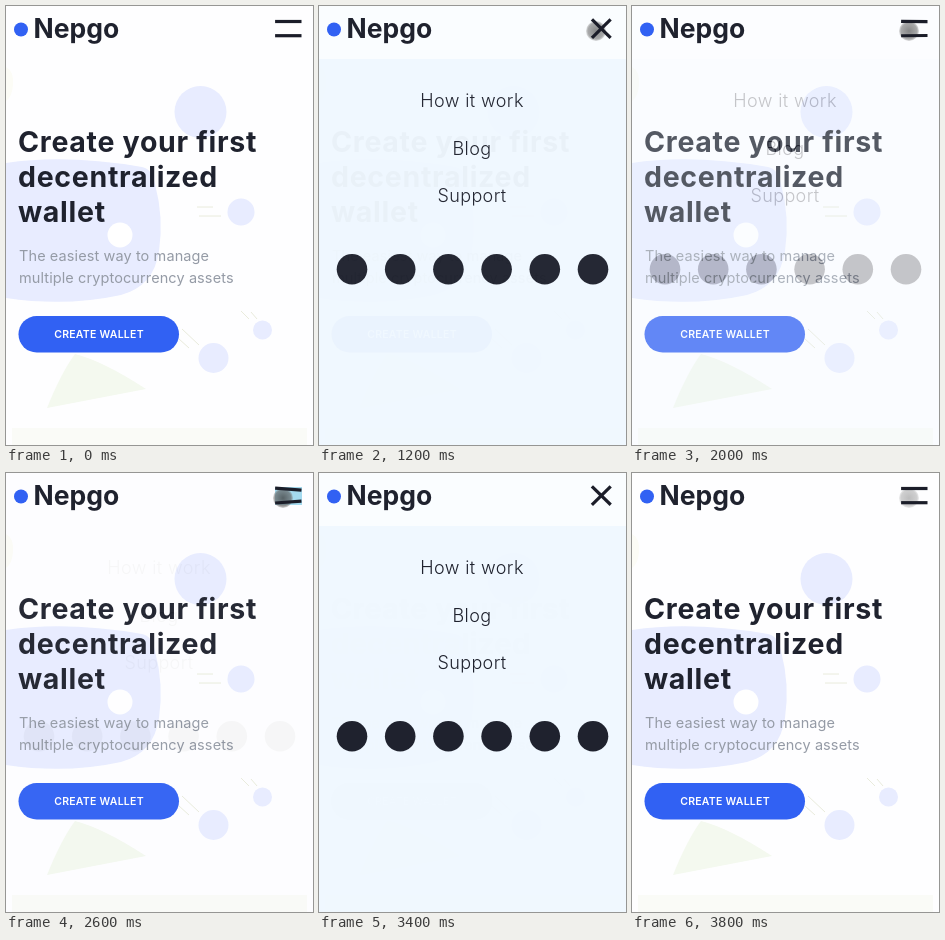
Recreate the animation shown at these times as an HTML page. Size 307 by 439 pixels, loop 4200 ms.

```html
<!DOCTYPE html>
<html lang="en">
<head>
<meta charset="utf-8">
<title>Wallet landing page menu</title>
<style>
  html, body { margin: 0; width: 100%; height: 100%; overflow: hidden; background: #fefeff; }
  svg { display: block; width: 100%; height: 100%; }
  text { font-family: Inter, "Open Sans", sans-serif; fill: #1f222e; }
  .brand { font-size: 26.5px; font-weight: 700; }
  .title { font-size: 28.5px; font-weight: 700; letter-spacing: .7px; }
  .lead { font-size: 14.5px; letter-spacing: .1px; fill: #959ba6; }
  .label { font-size: 10.5px; font-weight: 600; letter-spacing: .25px; fill: #fff; text-anchor: middle; }
  .link { font-size: 18px; font-weight: 300; letter-spacing: .4px; text-anchor: middle; }
  .coin { fill: #e8ecff; }
  .dash { stroke: #e9ebdc; fill: none; }
</style>
</head>
<body>
<svg viewBox="0 0 307 439">
  <defs>
    <radialGradient id="touch">
      <stop offset="0" stop-color="#444" stop-opacity=".8"/>
      <stop offset=".8" stop-color="#666" stop-opacity=".7"/>
      <stop offset="1" stop-color="#888" stop-opacity=".35"/>
    </radialGradient>
  </defs>

  <!-- page -->
  <path class="coin" d="M0 157Q60 148 136 161Q146 163 149 178Q158 212 153 245Q148 280 115 289Q60 301 0 292Z"/>
  <path d="M0 61Q8 65 7 79Q6 91 0 95Z" fill="#fcfcf6"/>
  <path d="M69 348Q97 355 140 383L41 402Q55 367 69 348Z" fill="#f4f9ef"/>
  <rect x="6" y="422" width="295" height="17" fill="#fafbf7"/>
  <path class="dash" d="M191 201h16M193 210h22M176 323l17 16M173 333l10 9M235 305l8 8M245 306l6 7"/>
  <g class="coin">
    <circle cx="194.5" cy="106" r="26"/>
    <circle cx="235" cy="206" r="13.5"/>
    <circle cx="207.5" cy="352" r="15"/>
    <circle cx="256.5" cy="324" r="9.5"/>
  </g>
  <circle cx="114" cy="229" r="12.5" fill="#fff"/>
  <g class="title">
    <text x="12" y="146">Create your first</text>
    <text x="12" y="181">decentralized</text>
    <text x="12" y="216">wallet</text>
  </g>
  <text class="lead" x="13" y="255">The easiest way to manage</text>
  <text class="lead" x="13" y="277">multiple cryptocurrency assets</text>
  <rect x="12.5" y="310" width="160.5" height="36.5" rx="18.2" fill="#3161f3"/>
  <text class="label" x="93" y="332">CREATE WALLET</text>

  <!-- menu -->
  <g id="menu">
    <rect width="307" height="53" fill="#fafdff"/>
    <rect y="53" width="307" height="386" fill="#f0f8ff"/>
    <text class="link" x="153" y="101">How it work</text>
    <text class="link" x="153" y="149">Blog</text>
    <text class="link" x="153" y="196">Support</text>
    <g id="socials" fill="#1f222e"></g>
  </g>

  <!-- header -->
  <circle cx="15" cy="23.5" r="7" fill="#3161f3"/>
  <text class="brand" x="27.5" y="31.5">Nepgo</text>
  <rect id="highlight" x="269" y="14" width="27" height="18" fill="#8fd3ec"/>
  <circle id="cursor" cx="277" cy="25" r="10" fill="url(#touch)"/>
  <g fill="#1b1d29">
    <rect id="top" x="-13.2" y="-1.6" width="26.4" height="3.2"/>
    <rect id="bottom" x="-13.2" y="-1.6" width="26.4" height="3.2"/>
  </g>
</svg>
<script>
const LOOP = 4200, STEP = 100;
const MENU_FADE = 400, ICON_TURN = 280, PRESS_HOLD = 250, PRESS_FADE = 250;

// Each tap shows the cursor at `press` and toggles the menu at `toggle`.
const taps = [
  { press: 900, toggle: 880, opens: true },
  { press: 1700, toggle: 1760, opens: false },
  { press: 2500, toggle: 2520, opens: true },
  { press: 3410, toggle: 3360, opens: false },
];

const el = id => document.getElementById(id);
const fade = (id, opacity) => el(id).setAttribute("opacity", opacity);
const clamp = x => Math.min(1, Math.max(0, x));
const easeInOut = p => p < .5 ? 4 * p ** 3 : 1 - 4 * (1 - p) ** 3;

// 0 = closed, 1 = open, for a transition of the given duration
const openness = (t, duration) => taps.reduce((sum, { toggle, opens }) =>
  sum + (opens ? 1 : -1) * easeInOut(clamp((t - toggle) / duration)), 0);

const pressOpacity = (t, { press }) =>
  t < press ? 0 : clamp(1 - (t - press - PRESS_HOLD) / PRESS_FADE);

const isHighlighted = (t, { toggle, opens }) =>
  opens && Math.abs(t - toggle - STEP) < STEP / 2;

function placeBar(id, side, cross) {
  const y = 22.6 + side * 7.1 * (1 - cross);
  el(id).setAttribute("transform", `translate(282.3 ${y}) rotate(${-side * 45 * cross})`);
}

function draw(time) {
  const t = Math.floor(time % LOOP / STEP) * STEP;
  const cross = openness(t, ICON_TURN);
  fade("menu", openness(t, MENU_FADE));
  fade("cursor", Math.max(...taps.map(tap => pressOpacity(t, tap))));
  fade("highlight", taps.some(tap => isHighlighted(t, tap)) ? .8 : 0);
  placeBar("top", -1, cross);
  placeBar("bottom", 1, cross);
}

el("socials").innerHTML = Array.from({ length: 6 }, (_, i) =>
  `<circle cx="${33 + i * 48.2}" cy="263.3" r="15.3"/>`).join("");

let start;
function tick(now) {
  start ??= now;
  draw(now - start);
  requestAnimationFrame(tick);
}
draw(0);
requestAnimationFrame(tick);
</script>
</body>
</html>
```
